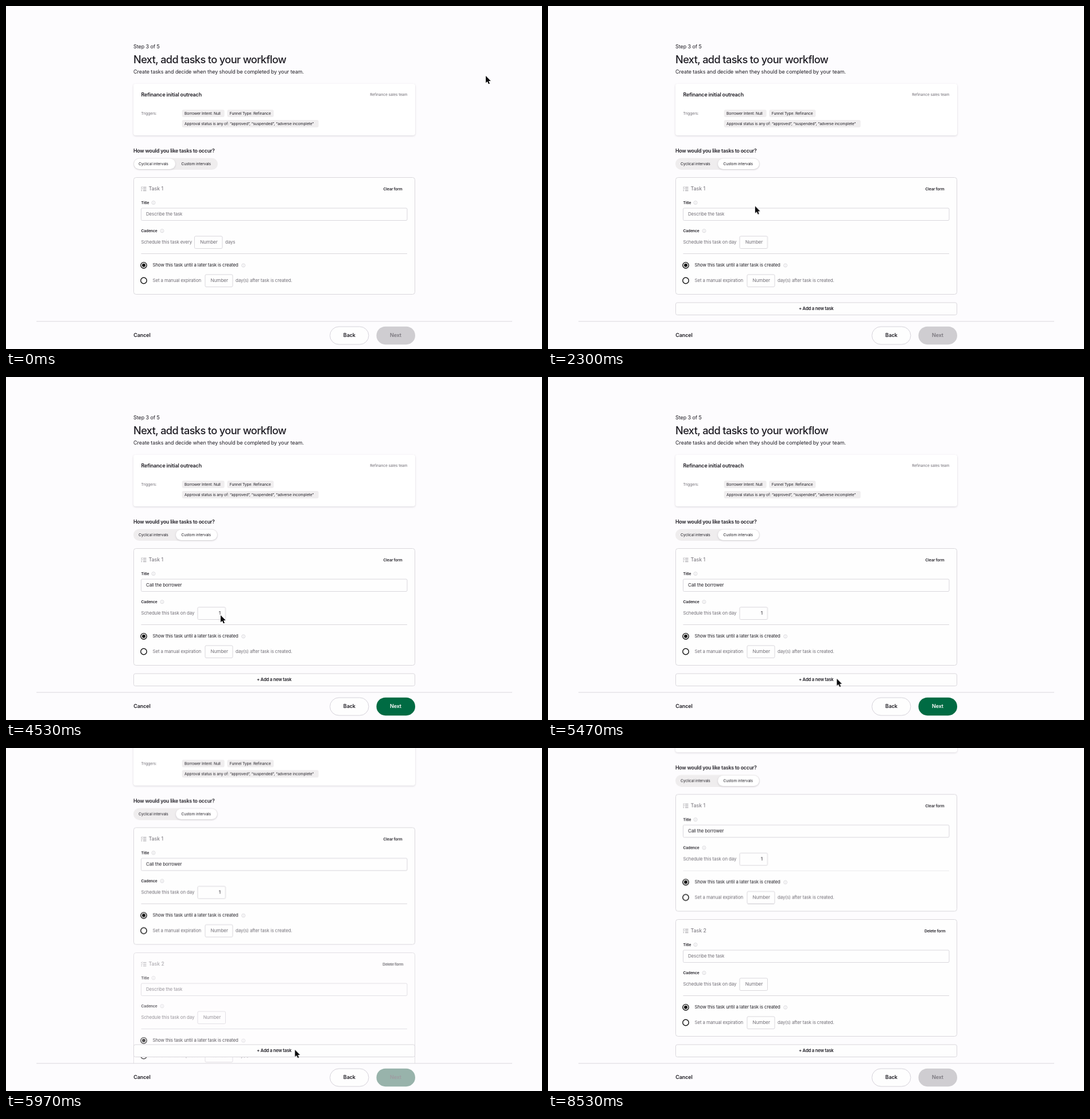
Recreate the animation shown at these times as an HTML page. Size 934 px wide and 599 px high, loop 8.91 s.

```html
<!DOCTYPE html>
<html lang="en">
<head>
<meta charset="utf-8">
<title>Workflow tasks</title>
<style>
html, body { margin: 0; width: 100%; height: 100%; overflow: hidden; background: #fdfcfe; }
svg { display: block; font-family: Inter, Roboto, sans-serif; }
text { fill: #1f1d24; white-space: pre; }
.h1 { font-size: 18.2px; font-weight: 500; letter-spacing: -.62px; }
.body { font-size: 9px; letter-spacing: -.08px; }
.head { font-size: 8.8px; font-weight: 600; letter-spacing: -.22px; }
.name { font-size: 9px; font-weight: 600; letter-spacing: -.19px; }
.small { font-size: 6.7px; letter-spacing: -.1px; }
.label { font-size: 6.7px; font-weight: 600; letter-spacing: -.1px; }
.form { font-size: 7.9px; letter-spacing: -.11px; }
.num { font-size: 8.2px; letter-spacing: -.1px; }
.add { font-size: 7.7px; font-weight: 600; letter-spacing: -.2px; }
.btn { font-size: 9px; font-weight: 600; letter-spacing: -.15px; }
.btn, .add { text-anchor: middle; }
.mute { fill: #716e76; }
.end { text-anchor: end; }
.box { fill: #fefefe; stroke: #d9d7dc; }
.line { fill: none; stroke: #d9d7dc; }
.ring { fill: #fefefe; stroke: #111; stroke-width: 1.4; }
.icon { fill: none; stroke: #85828a; stroke-width: .9; }
.info { fill: none; stroke: #cbc9cf; stroke-width: .7; }
.raised { fill: #fff; filter: drop-shadow(0 1px 1.5px rgba(30, 20, 40, .17)); }

.anim { animation: 8910ms infinite ease-out; }
.pill { animation-name: pill; }
.nudge { animation-name: nudge; }
.tab-in { animation-name: tab-in; }
.tab-out { animation-name: tab-out; }
.day-in { animation-name: day-in; animation-timing-function: ease-in-out; }
.day-out { animation-name: day-out; animation-timing-function: ease-in-out; }
.next-fill { animation-name: next-fill; animation-timing-function: ease-in-out; }
.next-text { animation-name: next-text; animation-timing-function: ease-in-out; }
.scroll { animation-name: scroll; animation-timing-function: ease-in-out; }
.card-in { animation-name: card-in; animation-timing-function: ease-in-out; }
.card-out { animation-name: card-out; animation-timing-function: ease-in-out; }
.cursor { animation-name: cursor; animation-timing-function: ease-in-out; }

@keyframes pill { 0%, 16.5% { transform: none } 19.8%, 100% { transform: translateX(73px) } }
@keyframes nudge { 0%, 16.5% { transform: none } 19.8%, 100% { transform: translateX(5.5px) } }
@keyframes tab-in { 0%, 16.5% { opacity: 0 } 19.8%, 100% { opacity: 1 } }
@keyframes tab-out { 0%, 16.5% { opacity: 1 } 19.8%, 100% { opacity: 0 } }
@keyframes day-in { 0%, 44.3% { opacity: 0 } 50.5%, 100% { opacity: 1 } }
@keyframes day-out { 0%, 44.3% { opacity: 1 } 50.5%, 100% { opacity: 0 } }
@keyframes next-fill { 0%, 44.3%, 69.42%, 100% { fill: #cfcdd1 } 50.5%, 62.68% { fill: #006b43 } }
@keyframes next-text { 0%, 44.3%, 69.42%, 100% { fill: #7b787f } 50.5%, 62.68% { fill: #fff } }
@keyframes scroll { 0%, 62.68% { transform: none } 69.42%, 100% { transform: translateY(-218.5px) } }
@keyframes card-in { 0%, 62.68% { opacity: 0 } 69.42%, 100% { opacity: 1 } }
@keyframes card-out { 0%, 62.68% { opacity: 1 } 69.42%, 100% { opacity: 0 } }
@keyframes cursor {
  0%, 2.4% { transform: translate(836px, 122px) }
  12.3% { transform: translate(337px, 270px) }
  13.1%, 22.2% { transform: translate(341px, 271px) }
  27.3% { transform: translate(365px, 366px) }
  38.6% { transform: translate(365px, 366px); animation-timing-function: cubic-bezier(.2, .4, .5, 1) }
  40.8%, 51% { transform: translate(374px, 416px) }
  61.7% { transform: translate(503.5px, 527px) }
  72.3% { transform: translate(503.5px, 527px); opacity: 1; animation-timing-function: cubic-bezier(.5, 0, .85, .475) }
  75.2% { transform: translate(510.5px, 531px); opacity: 1; animation-timing-function: cubic-bezier(.5, .08, .8, .526) }
  80.6% { transform: translate(817px, 560px); opacity: 1; animation-timing-function: step-start }
  80.61%, 100% { transform: translate(817px, 560px); opacity: 0 }
}
</style>
</head>
<body>
<script>
const LOOP = 8910;
const TYPED = 'Call the borrower';
const TYPE_START = 2565, TYPE_STEP = 53.75;

const text = (x, y, cls, str, attrs = '') => `<text x="${x}" y="${y}" class="${cls}" ${attrs}>${str}</text>`;
const rect = (x, y, w, h, r, cls, attrs = '') =>
  `<rect x="${x}" y="${y}" width="${w}" height="${h}" rx="${r}" class="${cls}" ${attrs}/>`;
const group = (cls, body, attrs = '') => `<g class="${cls}" ${attrs}>${body}</g>`;
const line = (x1, x2, y) => `<path class="line" d="M${x1} ${y}H${x2}"/>`;
const info = (x, y) =>
  `<g class="info"><circle cx="${x}" cy="${y}" r="3"/><path d="M${x} ${y - .4}v2M${x} ${y - 1.7}v.7"/></g>`;
const radio = (y, on) => `<circle cx="240" cy="${y}" r="5.2" class="ring"/>` +
  (on ? `<circle cx="240" cy="${y}" r="3" fill="#111"/>` : '');
const chip = (x, y, w, str) => rect(x, y, w, 13, 3, '', 'fill="#f0eeef"') + text(x + 4.3, y + 8.9, 'small', str);
const listIcon = `<path class="icon" d="M239 316.5h5.5M239 319.5h5.5M239 322.5h5.5
  M235.5 316.3l.8.8 1.4-1.6M235.5 319.3l.8.8 1.4-1.6M235.5 322.5h1.6"/>`;

function card(heading, cadence, titleId) {
  return rect(222.5, 299.5, 490, 204, 4, 'box') + listIcon + heading +
    text(235.5, 346, 'label', 'Title') + info(257, 343.5) +
    rect(235.5, 353, 463.5, 21.5, 2, 'box') +
    text(244, 366.2, 'form mute', 'Describe the task', titleId ? 'id="hint"' : '') +
    (titleId ? text(244, 366.2, 'form', '', `id="${titleId}"`) : '') +
    text(235.5, 395, 'label', 'Cadence') + info(272, 392.7) + cadence +
    line(235.5, 699, 432.5) +
    radio(452.8, true) + text(255.5, 455.3, 'form', 'Show this task until a later task is created') + info(413.7, 453) +
    radio(479.5, false) + text(255.5, 482, 'form mute', 'Set a manual expiration') +
    rect(347, 469, 48, 21.5, 2, 'box') + text(356.5, 482.2, 'num mute', 'Number') +
    text(400, 482, 'form mute', 'day(s) after task is created.');
}

const heading = (name, action, x) => text(248.5, 322.3, 'body mute', name) + text(x, 321.6, 'label', action);
const clearHeading = heading('Task 1', 'Clear form', 657.5);
const onDay = text(235.5, 415, 'form mute', 'Schedule this task on day');

const firstCadence =
  group('anim tab-out', text(235.5, 415, 'form mute', 'Schedule this task every') + text(382, 415, 'form mute', 'days')) +
  group('anim tab-in', onDay) +
  group('anim nudge', rect(328.5, 402, 48.5, 21.5, 2, 'box') +
    text(338.3, 415.2, 'num mute anim day-out', 'Number') +
    text(368.5, 415.2, 'num end anim day-in', '1'));

const secondCadence = onDay + rect(334, 402, 48.5, 21.5, 2, 'box') + text(343.8, 415.2, 'num mute', 'Number');

const summary = rect(222, 136, 491, 90, 4, 'raised') +
  text(235.5, 158.2, 'name', 'Refinance initial outreach') +
  text(699.5, 156.7, 'small mute end', 'Refinance sales team') +
  text(235.5, 190, 'small mute', 'Triggers:') +
  chip(306.7, 181, 74, 'Borrower Intent: Null') +
  chip(385.5, 181, 81, 'Funnel Type: Refinance') +
  chip(306.7, 199, 238, 'Approval status is any of: “approved”, “suspended”, “adverse incomplete”');

const tabs = rect(222, 265.5, 147, 20.5, 10.2, '', 'fill="#efedee"') +
  rect(223, 266.5, 72, 18.5, 9.2, 'raised anim pill') +
  text(231, 278, 'small', 'Cyclical intervals') + text(305.5, 278, 'small', 'Custom intervals');

const page =
  text(222, 73.7, 'body', 'Step 3 of 5') +
  text(222, 99.7, 'h1', 'Next, add tasks to your workflow') +
  text(222, 118.2, 'body', 'Create tasks and decide when they should be completed by your team.') +
  summary +
  text(222, 256.2, 'head', 'How would you like tasks to occur?') + tabs +
  card(clearHeading, firstCadence, 'typed') +
  group('', group('anim card-in', card(
    group('anim card-out', clearHeading) + group('anim card-in', heading('Task 2', 'Delete form', 656)),
    secondCadence)), 'transform="translate(0 218.5)"');

const footer = rect(0, 551, 934, 48, 0, '', 'fill="#fdfcfe"') + line(53, 882, 550.8) +
  text(237, 578.2, 'btn', 'Cancel') +
  rect(564.5, 560, 67.5, 31, 15.5, '', 'fill="#fefefe" stroke="#d5d2da"') + text(598.3, 578.2, 'btn', 'Back') +
  rect(645.5, 559.7, 67.5, 31.5, 15.7, 'anim next-fill') + text(679, 578.2, 'btn anim next-text', 'Next');

const addButton = group('anim tab-in', rect(222.5, 518, 490, 21.5, 3, 'box') + text(467.2, 530.8, 'add', '+ Add a new task'));

const cursor = `<path class="anim cursor" d="M0 0V12.3L2.8 9.7 4.9 14.3 7 13.4 5 8.9H8.8Z"
  fill="#0b0b0d" stroke="#fff" stroke-width=".8" stroke-linejoin="round" paint-order="stroke"/>`;

document.body.innerHTML = `<svg width="934" height="599" viewBox="0 0 934 599">
  ${group('anim scroll', page)}${addButton}${footer}${cursor}</svg>`;

const typed = document.getElementById('typed');
const hint = document.getElementById('hint');

function tick() {
  const t = performance.now() % LOOP;
  const count = Math.max(0, Math.min(TYPED.length, Math.floor((t - TYPE_START) / TYPE_STEP) + 1));
  typed.textContent = TYPED.slice(0, count);
  hint.style.visibility = count ? 'hidden' : 'visible';
  requestAnimationFrame(tick);
}
tick();
</script>
</body>
</html>
```
